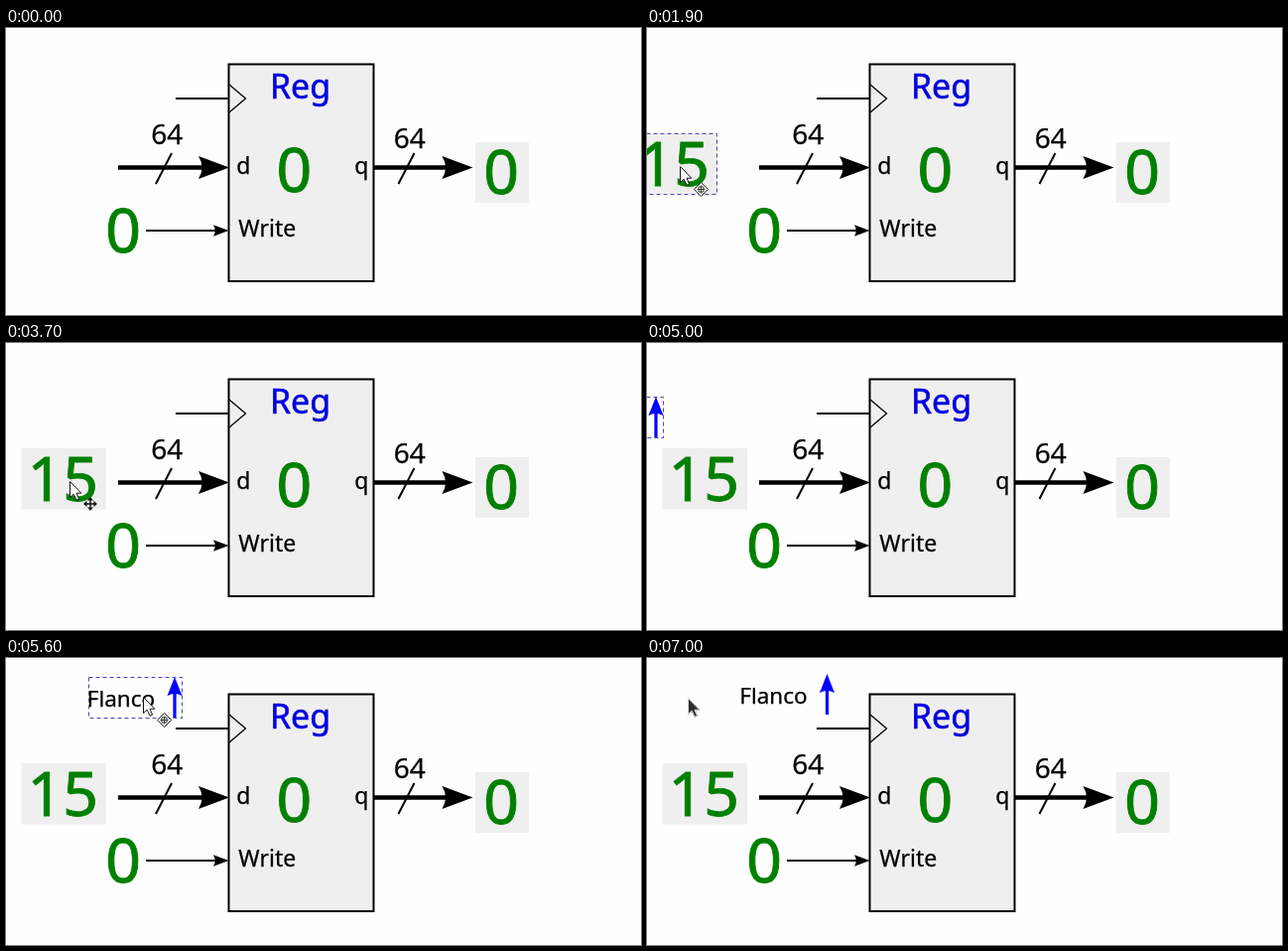
Animation, 640 px wide and 289 px high, one loop 8000 ms. Source, as an HTML page:

```html
<!DOCTYPE html>
<html lang="es">
<head>
<meta charset="utf-8">
<title>Register</title>
<style>
html, body { margin: 0; width: 100%; height: 100%; overflow: hidden; background: #fefefe; }
svg { display: block; width: 100vw; height: 100vh; font-family: "Noto Sans", "Open Sans", sans-serif; }
text { stroke: #000; stroke-width: .25; }
.digit { font-size: 62.5px; fill: #008000; stroke: #008000; stroke-width: .9; text-anchor: middle; }
.bits { font-size: 28px; text-anchor: middle; }
.pin { font-size: 23px; }
.title { font-size: 34px; fill: #0000e0; stroke: #0000e0; stroke-width: .5; text-anchor: middle; }
.panel { fill: #f0efef; }
.wire { stroke: #000; stroke-width: 2; fill: none; }
.bus { stroke-width: 4.5; }
.clock { stroke-width: 1.3; }
.marquee { fill: none; stroke: #4a4ab4; stroke-dasharray: 4 3; }

.track { animation: 8s step-end -20ms infinite; }
#value { animation-name: value; }
#edge { animation-name: edge; }
#pointer { animation-name: pointer; }
#value .marquee { animation-name: value-marquee; }
#value .handles { animation-name: value-handles; }
#value .grab { animation-name: value-grab; }
#edge .marquee { animation-name: edge-marquee; }
#edge .handles { animation-name: edge-handles; }
#edge .grab { animation-name: edge-grab; }
#pointer .hover { animation-name: hover; }
#pointer .idle { animation-name: idle; }

/* 1.25% is 100 ms */
@keyframes value {
  0% { translate: -110px 106px; }
  17.5% { translate: -76px 106px; }
  18.75% { translate: -64px 106px; }
  20% { translate: -51px 106px; }
  21.25% { translate: -39px 106px; }
  22.5% { translate: -27px 106px; }
  23.75% { translate: -15px 106px; }
  25% { translate: -5px 106px; }
  26.25% { translate: 4px 106px; }
  27.5% { translate: 10px 106px; }
  28.75% { translate: 13px 106px; }
  31.25%, 100% { translate: 15px 106px; }
}
@keyframes edge {
  0% { translate: -130px 60px; }
  62.5% { translate: -78px 54px; }
  63.75% { translate: -52px 44px; }
  65% { translate: -22px 36px; }
  66.25% { translate: 10px 29px; }
  67.5% { translate: 40px 24px; }
  68.75% { translate: 66px 21px; }
  70% { translate: 83px 19px; }
  71.25% { translate: 86px 19px; }
  72.5% { translate: 87px 19px; }
  73.75% { translate: 91px 17px; }
  77.5%, 100% { translate: 94.5px 16px; }
}
@keyframes pointer {
  0% { translate: -60px 139px; }
  40% { translate: 64px 139px; }
  48.75% { translate: 55px 145px; }
  50% { translate: 36px 156px; }
  51.25% { translate: 14px 157px; }
  52.5% { translate: -60px 157px; }
  78.75% { translate: 150px 36px; }
  83.75% { translate: 125px 43px; }
  85% { translate: 79px 42px; }
  87.5%, 100% { translate: 41px 40px; }
}
@keyframes value-marquee { 0% { opacity: 1; } 46.25%, 100% { opacity: 0; } }
@keyframes value-handles { 0% { opacity: 0; } 40% { opacity: 1; } 46.25%, 100% { opacity: 0; } }
@keyframes value-grab { 0% { opacity: 1; } 40%, 100% { opacity: 0; } }
@keyframes edge-marquee { 0% { opacity: 1; } 82.5%, 100% { opacity: 0; } }
@keyframes edge-handles { 0% { opacity: 0; } 78.75% { opacity: 1; } 82.5%, 100% { opacity: 0; } }
@keyframes edge-grab { 0% { opacity: 0; } 63.75% { opacity: 1; } 78.75%, 100% { opacity: 0; } }
@keyframes hover { 0% { opacity: 1; } 50% { opacity: 0; } 78.75% { opacity: 1; } 85%, 100% { opacity: 0; } }
@keyframes idle { 0% { opacity: 0; } 85%, 100% { opacity: 1; } }
</style>
</head>
<body>
<svg viewBox="0 0 640 289" preserveAspectRatio="none">
  <defs>
    <path id="head" d="M0 0L-31-11.5Q-24 0-31 11.5Z"/>
    <path id="resize" d="M-6 0L-2-4V-1.3H2V-4L6 0L2 4V1.3H-2V4Z"/>
    <path id="arrow" d="M.5.5V16.5L4.2 13.2L7 19.3L9.6 18.2L7 12.2H11.8Z"/>
    <g id="move" stroke="#111" stroke-width="1.4">
      <path d="M0-6V6M-6 0H6"/>
      <path d="M0-7L3-3.5H-3ZM0 7L3 3.5H-3ZM-7 0L-3.5-3V3ZM7 0L3.5-3V3Z" fill="#111" stroke="none"/>
    </g>
    <g id="drag" stroke="#222">
      <path d="M0-7L7 0L0 7L-7 0Z" fill="#fff"/>
      <path d="M0-4V4M-4 0H4M-2.5-2.5H2.5V2.5H-2.5Z" fill="none" stroke-width=".9"/>
    </g>
    <g id="grab">
      <use href="#arrow" fill="#fff" stroke="#111"/>
      <use href="#drag" x="21.5" y="23.5"/>
    </g>
  </defs>

  <rect class="panel" x="473" y="115" width="54" height="61"/>
  <rect class="panel" x="224.5" y="36.5" width="146" height="218.5"/>
  <rect class="wire" x="224.5" y="36.5" width="146" height="218.5"/>
  <path class="wire" d="M171 71H225"/>
  <path class="wire clock" d="M225 57L241.5 71L225 85"/>
  <path class="wire bus" d="M113 140.5H200M370 140.5H445"/>
  <path class="wire" d="M141 204H213M151 157L167 126M395.5 157L411.5 126"/>
  <use href="#head" x="225" y="140.5"/>
  <use href="#head" x="470.5" y="140.5"/>
  <use href="#head" transform="translate(224.5 204) scale(.5)"/>

  <text class="title" x="296.5" y="70.5">Reg</text>
  <text class="bits" x="162.3" y="117.3">64</text>
  <text class="bits" x="406.8" y="121.3">64</text>
  <text class="pin" x="232.3" y="147">d</text>
  <text class="pin" x="351.3" y="147">q</text>
  <text class="pin" x="234.3" y="210.3">Write</text>
  <text class="digit" x="290.3" y="165.3">0</text>
  <text class="digit" x="118" y="226.3">0</text>
  <text class="digit" x="499" y="167.3">0</text>

  <g id="value" class="track">
    <rect class="panel" x=".5" width="85.5" height="61.5"/>
    <text class="digit" x="42.3" y="53">15</text>
    <rect class="marquee track" x=".5" y=".5" width="85" height="61"/>
    <g class="handles track" data-size="85,61"></g>
    <use class="grab track" href="#grab" x="48" y="33"/>
  </g>

  <g id="edge" class="track">
    <text x="-1.3" y="30" font-size="22.5">Flanco</text>
    <path d="M87 14V41" stroke="#00f" stroke-width="3.2"/>
    <use href="#head" fill="#00f" transform="translate(87 0) rotate(-90) scale(.62 .66)"/>
    <rect class="marquee track" x=".5" y=".5" width="94" height="41"/>
    <g class="handles track" data-size="94,41"></g>
    <use class="grab track" href="#grab" x="55" y="20"/>
  </g>

  <g id="pointer" class="track">
    <use href="#arrow" fill="#fff" stroke="#111"/>
    <use class="hover track" href="#move" x="21" y="23"/>
    <use class="idle track" href="#arrow" fill="#2c2c2c" stroke="#e8e8e8"/>
  </g>
</svg>
<script>
// Resize arrows on the corners and sides of each selection
for (const box of document.querySelectorAll('.handles')) {
  const [w, h] = box.dataset.size.split(',').map(Number);
  for (const i of [-1, 0, 1]) {
    for (const j of [-1, 0, 1]) {
      if (!i && !j) continue;
      const x = (1 + i) * w / 2 + i * 6.5;
      const y = (1 + j) * h / 2 + j * 6.5;
      const turn = Math.atan2(j, i) * 180 / Math.PI;
      const use = document.createElementNS('http://www.w3.org/2000/svg', 'use');
      use.setAttribute('href', '#resize');
      use.setAttribute('transform', `translate(${x} ${y}) rotate(${turn})`);
      box.append(use);
    }
  }
}
</script>
</body>
</html>
```
